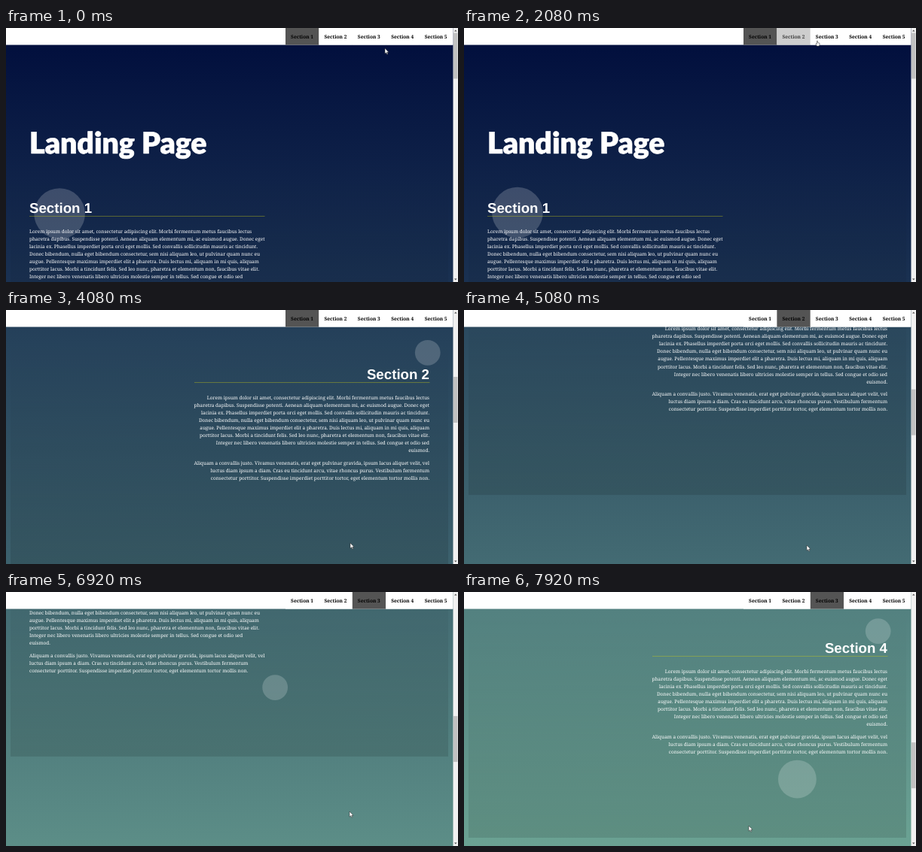
These frames come from a looping animation (600 px wide and 338 px high, 8000 ms). An HTML page:

```html
<!DOCTYPE html>
<html lang="en">
<head>
<meta charset="utf-8">
<title>Landing Page</title>
<style>
  html, body { margin: 0; width: 100%; height: 100%; overflow: hidden; }
  svg { display: block; width: 600px; height: 338px; text-rendering: geometricPrecision; }
  .title { font: 900 39.3px Lato, "Open Sans", sans-serif; fill: #fff; stroke: #fff; stroke-width: .7px; }
  .heading { font: bold 18.7px "Liberation Sans", Arial, sans-serif; fill: #fff; }
  .copy { font: 6.45px "Noto Serif", serif; fill: #fff; }
  .link { font: bold 6.6px "Noto Serif", serif; text-anchor: middle; }
  .right { text-anchor: end; }
  .circle { fill: rgba(255, 255, 255, .187); }
</style>
</head>
<body>
<svg viewBox="0 0 600 338">
  <defs>
    <linearGradient id="sky" x1="0" y1="0" x2="0" y2="1">
      <stop offset="0" stop-color="rgb(0,13,60)"/>
      <stop offset="1" stop-color="rgb(136,203,171)"/>
    </linearGradient>
    <linearGradient id="shade" x1="0" y1="0" x2="0" y2="1">
      <stop offset="0" stop-opacity="0"/>
      <stop offset="1" stop-opacity=".12"/>
    </linearGradient>
  </defs>
  <g id="page">
    <rect width="600" height="1795" fill="url(#sky)"/>
    <text class="title" x="31" y="167">Landing Page</text>
  </g>
  <g id="nav"><rect width="593.5" height="22.5" fill="#fff"/></g>
  <g id="scrollbar">
    <rect x="593.5" width="6.5" height="338" fill="#f1f1f1"/>
    <path d="M595 4.5l1.8-2 1.8 2zM595 333.5l1.8 2 1.8-2z" fill="#505050"/>
    <rect id="thumb" x="594" width="5.5" height="61" fill="#c1c1c1"/>
  </g>
  <g id="cursor" stroke="#222" stroke-width=".5" fill="#fff" stroke-linejoin="round">
    <path id="arrow" d="M0 0V7.2L1.7 5.7 2.8 8.2 3.9 7.7 2.8 5.3H5z"/>
    <path id="hand" d="M-.6 .4Q0-.5 .6 .4V2.6L3 3.2V5.2L2.4 7H-.7L-2.2 4.2-1.6 3.6-.6 4.4z"/>
  </g>
</svg>
<script>
const LOOP = 8000, SECTION_TOP = 190, SECTION_HEIGHT = 302, VISIBLE_LEAD = 210;
const ORBIT = 6.4, TURN = 2 * Math.PI;
const COPY = [
  ["Lorem ipsum dolor sit amet, consectetur adipiscing elit. Morbi fermentum metus faucibus lectus",
   "pharetra dapibus. Suspendisse potenti. Aenean aliquam elementum mi, ac euismod augue. Donec eget",
   "lacinia ex. Phasellus imperdiet porta orci eget mollis. Sed convallis sollicitudin mauris ac tincidunt.",
   "Donec bibendum, nulla eget bibendum consectetur, sem nisi aliquam leo, ut pulvinar quam nunc eu",
   "augue. Pellentesque maximus imperdiet elit a pharetra. Duis lectus mi, aliquam in mi quis, aliquam",
   "porttitor lacus. Morbi a tincidunt felis. Sed leo nunc, pharetra et elementum non, faucibus vitae elit.",
   "Integer nec libero venenatis libero ultricies molestie semper in tellus. Sed congue et odio sed",
   "euismod."],
  ["Aliquam a convallis justo. Vivamus venenatis, erat eget pulvinar gravida, ipsum lacus aliquet velit, vel",
   "luctus diam ipsum a diam. Cras eu tincidunt arcu, vitae rhoncus purus. Vestibulum fermentum",
   "consectetur porttitor. Suspendisse imperdiet porttitor tortor, eget elementum tortor mollis non."]
];

// Eased moves, each a start time, a duration and the distance covered.
const WHEEL = [
  { at: 2560, time: 520, by: [177] },
  { at: 3430, time: 700, by: [283] },
  { at: 4915, time: 485, by: [324] },
  { at: 5930, time: 400, by: [93] },
  { at: 6915, time: 540, by: [194] }
];
const POINTER = [
  { at: 1500, time: 350, by: [-63, -10] },
  { at: 1900, time: 180, by: [29, 0] },
  { at: 2150, time: 500, by: [59, 185] },
  { at: 3450, time: 700, by: [-73, 111] },
  { at: 6100, time: 700, by: [1, -21] },
  { at: 6950, time: 400, by: [-78, 19] }
];

const byId = id => document.getElementById(id);
const clamp = v => Math.max(0, Math.min(1, v));
const ease = u => u * u * (3 - 2 * u);
const grey = v => `rgb(${v},${v},${v})`;

const travel = (start, moves, t) => start.map((value, axis) =>
  moves.reduce((sum, { at, time, by }) => sum + by[axis] * ease(clamp((t - at) / time)), value));
const scrollAt = t => travel([0], WHEEL, t)[0];
const sectionAt = y => Math.max(0, Math.floor((y - SECTION_TOP) / SECTION_HEIGHT));

function add(parent, tag, attributes, text = "") {
  const node = document.createElementNS("http://www.w3.org/2000/svg", tag);
  for (const name in attributes) node.setAttribute(name, attributes[name]);
  node.textContent = text;
  return parent.appendChild(node);
}

function shownSince(index) {
  let t = -510;
  while (t < LOOP && sectionAt(scrollAt(t) + VISIBLE_LEAD) < index) t += 5;
  return t;
}

// Every section has an upper circle; the first two of each three also differ in the lower one.
function circlesOf(i, right) {
  const since = shownSince(i);
  const circles = [{
    x: right ? 556 : 64.7, y: right ? 26 : 57, r: right ? 16.9 : 33.8,
    angle: t => TURN * t / 1060
  }];
  const angle = t => TURN * (.5 - (t - since) / 1275);
  if (i % 3 === 0) circles.push({ x: right ? 441.6 : 222.6, y: 230.4, r: 25.4, angle });
  if (i % 3 === 2) circles.push({ x: 351.7, y: 206.8, r: 16.9, angle });
  return circles;
}

const sections = [0, 1, 2, 3].map(i => {
  const right = i % 2 === 1, x = right ? 562 : 31, align = right ? " right" : "";
  const group = add(byId("page"), "g", { transform: `translate(0 ${SECTION_TOP + i * SECTION_HEIGHT})` });
  add(group, "rect", { x: 6, width: 581, height: SECTION_HEIGHT, fill: "url(#shade)" });
  const circles = circlesOf(i, right);
  for (const circle of circles) circle.node = add(group, "circle", { r: circle.r, class: "circle" });
  add(group, "text", { x, y: 56, class: "heading" + align }, `Section ${i + 1}`);
  add(group, "rect", { x: right ? 250 : 31, y: 60, width: 312.5, height: 1, fill: "rgba(204,204,17,.38)" });
  COPY.forEach((lines, p) => lines.forEach((line, n) =>
    add(group, "text", { x, y: 83.3 + p * 86.4 + n * 10.02, class: "copy" + align }, line)));
  return { group, circles };
});

const links = [0, 1, 2, 3, 4].map(i => {
  const x = 371 + i * 44.4;
  return {
    cell: add(byId("nav"), "rect", { x, width: 44.4, height: 22.5 }),
    label: add(byId("nav"), "text", { x: x + 22, y: 13.7, class: "link" }, `Section ${i + 1}`)
  };
});

function draw(t) {
  const scroll = scrollAt(t);
  byId("page").setAttribute("transform", `translate(0 ${-scroll})`);
  byId("thumb").setAttribute("y", 6.5 + scroll / 5.53);

  const shown = sectionAt(scroll + VISIBLE_LEAD);
  sections.forEach(({ group, circles }, i) => {
    group.setAttribute("visibility", i === shown ? "visible" : "hidden");
    for (const { node, x, y, angle } of circles) {
      node.setAttribute("cx", x + ORBIT * Math.cos(angle(t)));
      node.setAttribute("cy", y + ORBIT * Math.sin(angle(t)));
    }
  });

  const current = sectionAt(scroll);
  const hover = Math.min(clamp((t - 1790) / 140), clamp((2115 - t) / 140));
  links.forEach(({ cell, label }, i) => {
    const level = i === 1 ? hover : 0;
    cell.setAttribute("fill", i === current ? "#545454" : grey(Math.round(255 - 204 * level)));
    label.setAttribute("fill", grey(Math.round(255 * level)));
  });

  const [x, y] = travel([503, 27], POINTER, t);
  const overLink = y < 22 && x > 371;
  byId("cursor").setAttribute("transform", `translate(${x} ${y})`);
  byId("arrow").setAttribute("visibility", overLink ? "hidden" : "visible");
  byId("hand").setAttribute("visibility", overLink ? "visible" : "hidden");
}

const begin = performance.now();
function tick() {
  draw((performance.now() - begin) % LOOP);
  requestAnimationFrame(tick);
}
tick();
</script>
</body>
</html>
```
